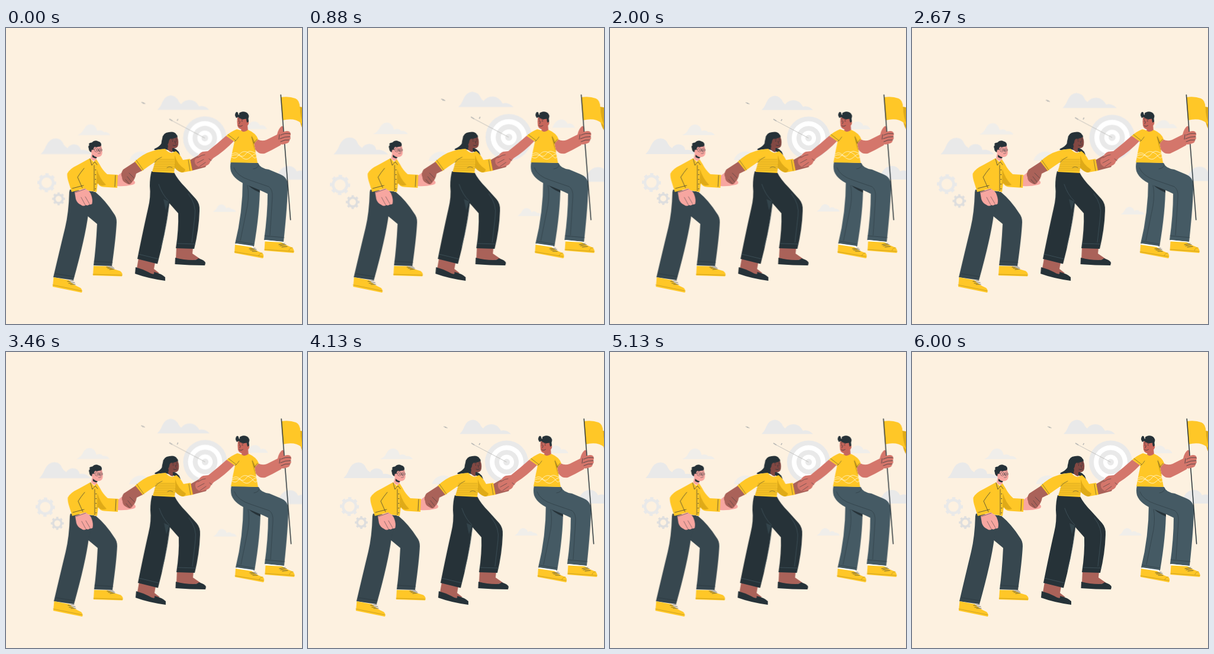
These frames come from a looping animation (500 px wide and 500 px high, 6040 ms). An HTML page:

```html
<!DOCTYPE html>
<html lang="en">
<head>
<meta charset="utf-8">
<title>Climbing together</title>
<style>
  html, body { margin: 0; width: 100%; height: 100%; overflow: hidden; background: #fdf1e0; }
  svg { display: block; width: 100vw; height: 100vh; }

  /* double heartbeat, then a long rest */
  #scenery { transform-origin: 287px 206px; animation: beat 6.04s -35ms linear infinite; }
  @keyframes beat {
    0%, 29.8%, 39.73%, 59.6%, 100% { transform: scale(1); }
    9.93%, 49.67% { transform: scale(1.1); }
  }

  #team { animation: shake 3.02s -38ms linear infinite; }
  @keyframes shake {
    0%, 100% { transform: translateX(0); }
    10%, 90% { transform: translateX(-1px); }
    20%, 80% { transform: translateX(2px); }
    30%, 50%, 70% { transform: translateX(-3px); }
    40%, 60% { transform: translateX(3px); }
  }

  .cloud { fill: #e9e9e9; }
  .pale { fill: #f0eeea; }
  .gold { fill: #ffc727; }
  .fold { fill: #dfaa18; }
  .ink { fill: #263238; }
  .slate { fill: #37474f; }
  .steel { fill: #455a64; }
  .pink { fill: #f7a6a0; }
  .rust { fill: #aa6259; }
  .dusk { fill: #824843; }
  .coral { fill: #d4766b; }
  .face { fill: #c7665b; }
  .sock { fill: #fff; }
  .line, .soft, .seam, .wave { fill: none; stroke: #263238; stroke-width: .7; stroke-linecap: round; stroke-linejoin: round; }
  .soft { stroke: #a17f17; stroke-width: .5; }
  .seam { stroke: #526a74; stroke-width: .5; }
  .wave { stroke: #fff3c4; stroke-width: .9; }
  .thin { stroke-width: .5; }
</style>
</head>
<body>
<svg viewBox="0 0 500 500">
  <g id="scenery">
    <path class="cloud" d="M60 213Q66 207 69 199Q75 186 86 186.500Q95 187 98 196Q100 200 105 203Q108 197 116 196.500Q126 197 127 206Q137 204 146 213Z"/>
    <path class="cloud" d="M256 138.500Q261 134 264 126Q269 115 278 114.500Q288 115 292 125Q294 128 296 129Q301 122 310 122Q320 122 326 133Q334 130 343 138.500Z"/>
    <path class="cloud" d="M446 256Q456 250 460 243Q466 233 476 233Q486 233 490 242Q500 237 507 248L518 256Z"/>
    <path class="pale" d="M122 181Q129 178 132 172Q136 163 144 163Q152 163 155 174Q162 171 166 176Q173 175 177 181Z"/>
    <path class="pale" d="M349 310Q355 306 357 301Q361 296 366 298Q371 300 371 304Q377 301 380 305Q386 305 388 310Z"/>
    <path class="pale" d="M404 171Q409 158 419 158Q426 159 428 165Q435 162 440 171Z"/>
    <path class="pale" d="M209 223Q213 212 224 209Q236 207 240 214L244 223Z"/>

    <g fill="none" stroke="#e9e9e9">
      <circle cx="70" cy="261" r="11" stroke-width="4.500"/>
      <circle cx="70" cy="261" r="13.800" stroke-width="4.400" pathLength="16" stroke-dasharray="1" stroke-dashoffset=".4"/>
      <g stroke="#dedede">
        <circle cx="90" cy="288" r="6.900" stroke-width="3.600"/>
        <circle cx="90" cy="288" r="9.100" stroke-width="3.400" pathLength="16" stroke-dasharray="1" stroke-dashoffset=".5"/>
      </g>
    </g>

    <g fill="#e9e9e9">
      <circle cx="335.500" cy="186" r="36.500"/>
      <circle cx="335.500" cy="186" r="28.500" fill="#fff"/>
      <circle cx="335.500" cy="186" r="20.500"/>
      <circle cx="335.500" cy="186" r="12.500" fill="#fff"/>
      <circle cx="335.500" cy="186" r="5.500"/>
    </g>
    <g fill="none" stroke="#b9b9b6" stroke-width=".8">
      <path d="M279 156L335.500 186"/>
      <path d="M276 154L281 157M289 157L290.500 154" stroke-width="1.600"/>
      <path d="M229 126L232 126.500L235.500 128.500M231 127.500L235 128" stroke-width="1.200"/>
    </g>
  </g>

  <g id="team">
    <!-- left climber -->
    <path class="slate" d="M137 276L151 277Q168 291 182 313Q187 319 187 328Q186 352 179 402L148 401Q152 372 154 331L136 316Z"/>
    <path class="ink" d="M148 282L137 319L141 300Z"/>
    <path class="slate" d="M108 273L148 276Q146 292 139 315Q134 354 114 426L80 421Q91 374 100 337Q106 312 107 277Z"/>
    <path class="line thin" d="M84 415L115 420M149 394L180 396"/>
    <path class="gold" d="M148 402L171 402.500Q182 408 193 410.500Q198 414 196 419.500L147 418Z"/>
    <path class="gold" d="M80.500 421L106 426Q114 434 126 439Q130 443 128 447L79 437Z"/>
    <path class="line" d="M170 404L180 403M172 406L182 405M175 408L183 407M104 428L114 427M106 431L116 430M109 433L117 433"/>
    <path class="soft" d="M147 416L196 417.500M79 434L128 444"/>

    <path class="pink" d="M188 250L197 243L207 246L218 260Q219 264 213 265Q200 268 188 267Z"/>
    <path class="pink" d="M145 211L153 213L153 224Q147 226 143 220Z"/>
    <path class="gold" d="M142 220L122 231Q107 238 103.500 246Q103 252 106 261L111 277L134 271L136 274L153 277L155 262Q158 268 165 268.500L188 270L189 248L171 247Q163 240 158 230L153 222L148 226Z"/>
    <path class="fold" d="M153.500 238Q158 254 169 265Q160 268 155 262L153 265Z"/>
    <path class="line" d="M132 237Q126 244 121 252L129 270M112 271L131 266M185 249L184 268M142 221L145 232L150 226L154 231M149 232L149 275"/>
    <path d="M151.300 239V274" stroke="#263238" stroke-width="1.300" stroke-dasharray="1.300 6.700"/>
    <path class="pink" d="M116 277L133 271Q142 275 144 282Q147 290 145.500 297Q143 299 141 298Q138 301 135 299Q131 302 127 299Q120 296 118 289Z"/>
    <path class="line thin" d="M127 286L134 299M134 285L141 297M117 278L134 272"/>
    <path class="pink" d="M144 206L149 199L161 199Q164 208 162 214Q160 218 155 218Q150 218 148 215Q143 212 144 206Z"/>
    <path class="ink" d="M146 214L150 217L154 218.500Q152 222 146 218Z"/>
    <path class="ink" d="M140 204Q138 199 141 198Q138 194 145 193.500Q150 188 156 191.500Q162 193 161 199Q155 202 150 200.500Q148 202 147.500 206L145 205.500L144 210Q140 208 140 204Z"/>
    <g class="line thin">
      <circle cx="152.800" cy="206" r="3.300"/>
      <circle cx="159.300" cy="206" r="2.800"/>
      <path d="M149.500 205L146 204.500M155.500 212Q158 213 160 211M157 206L158 209.500M151 201.500L154 200.800M158 200.500L160.500 201"/>
    </g>
    <path d="M153.300 205.300V207M159.300 205.300V207" stroke="#263238" stroke-width="1.200"/>

    <!-- middle climber -->
    <path class="rust" d="M224 389L252 396L250 407L259 414L240 417L221 406Z"/>
    <path class="rust" d="M288 370L316 371L315 381L328 390L308 394L287 390Z"/>
    <path class="ink" d="M219 404Q230 407 240 412Q252 419 250 412Q263 415 269 421L269 427Q240 423 218 415Z"/>
    <path class="ink" d="M286 388Q300 392 316 392Q323 392 325 389Q336 392 337 397L336 401Q310 401 285.500 399Z"/>
    <path class="ink" d="M246 242L284 244Q290 256 303 269L321 289Q328 297 327 309Q326 340 318 373L287 372Q292 340 291 313L276 296Q269 350 256 398.500L222 390Q232 340 240 305Q245 285 243 267Q243 252 246 242Z"/>
    <path class="steel" d="M266 289L275 293L270 308Z" opacity=".45"/>
    <path class="seam" d="M224 382L257 390M289 364L320 365M258 264Q264 282 275 292M276 296Q273 330 262 369M308 280Q322 298 319 318L314 362"/>

    <path class="ink" d="M264 187Q265 177 275 176Q285 174 288 180Q291 182 289 188L283 198L284 203Q294 207 294 218Q289 216 286 210L270 205Q262 204 254 206Q249 207 251 204Q260 200 262.500 195Q263 190 264 187Z"/>
    <path class="rust" d="M311 223L325 215L344 220L337 235L314 241Z"/>
    <path class="gold" d="M269 204Q255 205 247 208Q232 212 217 226L229 242Q240 234 252 226L247 243L284 245L285 236Q291 243 298 244L315 241L311 221L299 223Q294 213 287 208L280 211Q273 210 269 204Z"/>
    <path class="fold" d="M285 215Q289 230 303 239Q302 244 297 244Q290 242 285 236Z"/>
    <path class="soft" d="M253 222H284M252 225H284M251 228H284M250 231H285M250 234H285M249 237H285M248 240H284"/>
    <path class="line thin" d="M251 227Q257 220 263 218M220 223L232 240M308 223L311 241M272 236Q276 233 281 236"/>
    <path class="dusk" d="M273 190Q279 184 289 184Q292 189 291 197Q290 203 284 203L281 203L281 210Q275 209 273 204L274 199Q271 196 273 190Z"/>
    <path class="ink" d="M268 182L280 179L289 185Q281 187 278 187Q275 189 275 193L272 200L267 200Z"/>
    <path class="line" d="M281.500 190V191.500M287.500 190V191.500M282 198Q285 200 288 197.500M285 191L286.500 195M279.500 188L283 187.300M286.500 187.500L289 188"/>
    <path class="rust" d="M218 226L198 239Q193 246 196 252Q196 259 203 262Q210 267 213 260Q218 256 220 246L230 241Z"/>
    <path class="line thin" d="M205 251L212 260M202 256L208 263M208 245L216 253"/>

    <!-- right climber -->
    <path class="steel" d="M400 254L429 268Q429 310 419 369L387 364Q400 312 400 256Z"/>
    <path class="ink" d="M403 259L429 268L429 278Q412 271 403 259Z"/>
    <path class="steel" d="M380 226L426 228Q429 237 444 239L463 247Q476 252 476 266Q476 295 469 361L436 358Q442 315 442 280Q430 274 412 267Q386 258 380 242Q378 234 380 226Z"/>
    <path class="line thin" d="M389 360L419 365M437 351L470 354M408 266Q411 280 408 300L396 359M385 236Q390 250 412 257L444 268Q451 273 450 286L446 350M427 231Q426 237 418 238"/>
    <path class="sock" d="M389 364L417 368L417 371L388 367ZM438 358L466 361L466 363L437 361Z"/>
    <path class="gold" d="M387 366L414 370Q423 377 433 380Q437 384 434 389L386 380Z"/>
    <path class="gold" d="M437.500 360.500L465 362Q475 368 484 371Q488 376 486 380L436.500 376Z"/>
    <path class="line" d="M411 373L421 372M413 375L423 374M416 377L424 377M461 366L471 364M463 368L473 366M466 370L475 369"/>
    <path class="soft" d="M386 378L434 386M437 374L486 377.500M427 385Q428 380 433 380M478 376Q479 371 484 371"/>

    <path class="coral" d="M425 188Q432 192 440 189L458 180Q460 170 466 165.500Q470 166 468 173L472 180L464 198Q450 206 437 212Q427 214 421 205L419 195Z"/>
    <path class="coral" d="M372 182L385 191Q369 208 350 220L345 226Q343 232 336 233Q327 237 323 233Q318 229 319 223Q320 220 324 219Q325 212 332 209L341 208L357 195Z"/>
    <path class="line thin" d="M324 219Q331 214 336 214M323 228L334 222M327 234L337 227M343 221L347 224"/>
    <path class="face" d="M398 166L408 163L409 175Q403 179 397 174Z"/>
    <path class="gold" d="M390 171Q380 175 372 182L386 192L383 206L379 227L425 228L421 207L419 195L426 188Q423 178 409 172Q402 178 397 173Z"/>
    <path class="fold" d="M415 181L421 193L419 196L422 210Q416 199 415 181Z"/>
    <path class="line thin" d="M375 180L388 190M419 194L424 188M386 192Q391 188 393 184M419 195L415 184"/>
    <path class="wave" d="M382 213Q388 208 394 214T405 213T416 209T422 211M381 218Q387 223 393 215T406 209T417 217T424 216M381 216Q390 211 398 218T412 219T423 212"/>
    <path class="face" d="M391 151Q390 158 391 165Q393 171 399 171Q405 170 408 165Q411 162 410 158L408 152Z"/>
    <path class="ink" d="M389 152Q385 146 389 142Q392 141 392.500 146L394 147Q393 143 396 142.500Q402 140 407 143Q412 147 409.500 153L410 158L407.500 160Q406 157 406 153.500Q397 155 392 150.500Z"/>
    <path class="line" d="M393.500 156V157.800M398.800 156V157.800M393 165Q396 167.500 399.500 164.500M395.500 158L394 162M392 153.800L394.500 153.300M397 153.800L400.500 154.500"/>

    <path class="fold" d="M496 133L514 136V180Q500 176 497 158Z"/>
    <path class="gold" d="M464.500 117Q478 115 489 119Q496 122 496.500 134Q497 150 503 165Q495 156 485 154.500Q476 153.500 467 156Z"/>
    <path d="M464.300 113L480.700 324" stroke="#263238" stroke-width="1.500" stroke-linecap="round"/>
    <path class="coral" d="M462 180Q463 176 470 175Q478 172 480.500 177Q482 180 480 183Q482 187 479 189Q479 194 474 195Q465 199 461 194Q459 187 462 180Z"/>
    <path class="line" d="M464 181Q471 177 480 178.500M463 187Q471 183 480 183.500M464 192Q471 188 479 189M462 180L461 188"/>
  </g>
</svg>
</body>
</html>
```
